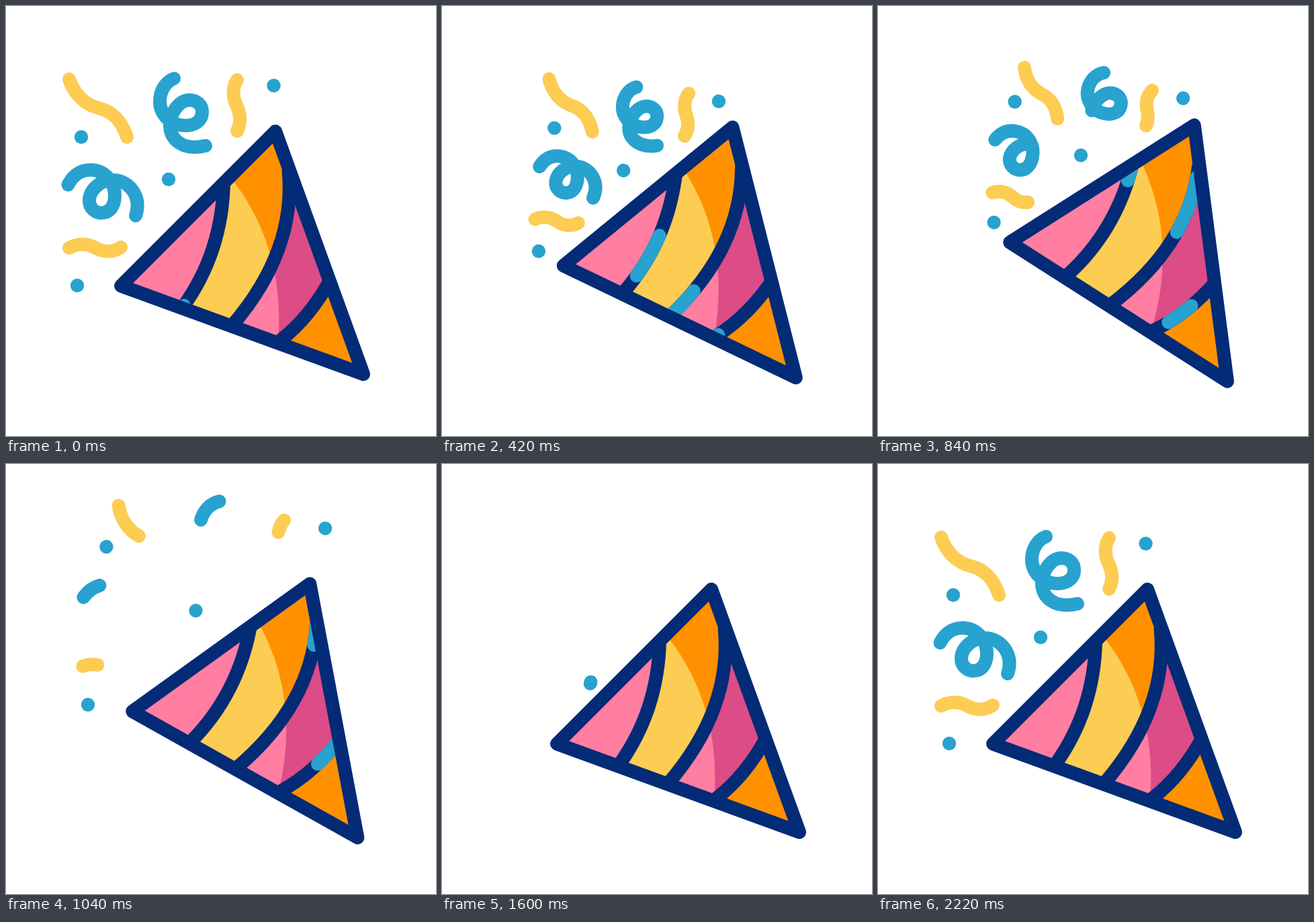
Animation of 640x640 px, one loop 2420 ms. Source, as an HTML page with a canvas:

```html
<!DOCTYPE html>
<html lang="en">
<head>
<meta charset="utf-8">
<title>Party popper</title>
<style>
  html, body { margin: 0; width: 100%; height: 100%; overflow: hidden; background: #fff; }
  canvas { display: block; width: 640px; height: 640px; }
</style>
</head>
<body>
<canvas id="stage" width="640" height="640"></canvas>
<script>
const ctx = document.getElementById('stage').getContext('2d');
const LOOP = 2420;
const NAVY = '#042b76', PINK = '#ff7ea2', YELLOW = '#fdcc52';
const ORANGE = '#ff9100', MAGENTA = '#dc4c87', TEAL = '#28a2cf';

const PIVOT = { x: 477.5, y: 498.5 };
const FOCUS = { x: 266, y: 311 };   // point the confetti shrinks towards

const ease = (t, start, duration) => {
  const u = Math.min(1, Math.max(0, (t - start) / duration));
  return (1 - Math.cos(Math.PI * u)) / 2;
};

function lengthOf(d) {
  const el = document.createElementNS('http://www.w3.org/2000/svg', 'path');
  el.setAttribute('d', d);
  return el.getTotalLength();
}

const curve = (d, extra) => ({ path: new Path2D(d), length: lengthOf(d), ...extra });

// Cone
const cone = new Path2D('M401 186.5 L171 416.5 L532 548 Z');
const stripeD = [
  'M264 447 Q322 366 324 262',
  'M337 475 Q432 364 420.5 245',
  'M408 498 Q453 463 484 405'
];
const stripes = [
  curve(stripeD[0], { start: -50, duration: 1120 }),
  curve(stripeD[1], { start: 139, duration: 1120 }),
  curve(stripeD[2], { start: 315, duration: 1180 })
];
const leftOfFirst = new Path2D(stripeD[0] + ' L300 100 L100 440 Z');
const leftOfSecond = new Path2D(stripeD[1] + ' L420 100 L100 100 L100 475 Z');
const rightOfThird = new Path2D(stripeD[2] + ' L600 405 L600 620 L408 620 Z');
const shade = new Path2D('M330 250 Q416 354 405 500 L600 600 L600 100 L330 100 Z');

// Confetti: leave = start of the burst, enter = start of the return, shift = offset at the return
const ribbons = [
  curve('M92.5 266 C100 251 112 244 126 244 C147 244 162 262 162 282 C162 298 154 308 142 308 ' +
        'C132 308 124 300 124 290 C124 274 140 259 159 259 C181 259 203 281 193 312',
        { color: TEAL, leave: 672, enter: 1570, shift: [28, 15] }),
  curve('M250 108 C237 113 229 127 229 142 C229 163 247 178 267 178 C282 178 292 170 292 158 ' +
        'C292 147 284 140 273 140 C258 140 244 159 244 178 C244 199 264 216 297 208',
        { color: TEAL, leave: 688, enter: 1605, shift: [12, 26] }),
  curve('M94 109 C101 130 117 147 138 152 S172 171 180 195',
        { color: YELLOW, leave: 800, enter: 1683, shift: [27, 29] }),
  curve('M344 110 C336 122 338 138 343 148 S351 172 344 186',
        { color: YELLOW, leave: 730, enter: 1624, shift: [5, 27] }),
  curve('M94 360 C108 352 122 354 133 360 S158 368 171 359',
        { color: YELLOW, leave: 740, enter: 1660, shift: [25, 7] })
];
const dots = [
  { x: 112, y: 195, leave: 670, enter: 1850, shift: [22, 16] },
  { x: 242, y: 258, leave: 700, enter: 1850, shift: [10, 14] },
  { x: 398.5, y: 118.5, leave: 700, enter: 1870, shift: [-8, 22] },
  { x: 106, y: 416, leave: 760, enter: 1870, shift: [24, -6] }
];

const TURN = 1450;   // between the burst and the return
const spread = (t, leave) => 1 - 0.25 * ease(t, 0, 700) + 0.44 * ease(t, leave, 500);

function coneAngle(t) {
  const degrees = 12.7 * ease(t, 0, 900) - 18.7 * ease(t, 900, 500) + 6 * ease(t, 1400, 200);
  return degrees * Math.PI / 180;
}

function fill(path, color) {
  ctx.fillStyle = color;
  ctx.fill(path);
}

function stroke(path, color) {
  ctx.strokeStyle = color;
  ctx.stroke(path);
}

function strokePart(path, length, from, to, color) {
  if (to - from < 0.001) return;
  const whole = from <= 0 && to >= 1;
  ctx.setLineDash(whole ? [] : [(to - from) * length, 3 * length]);
  ctx.lineDashOffset = -from * length;
  stroke(path, color);
  ctx.setLineDash([]);
}

function drawRibbon(r, t) {
  const leaving = t < TURN;
  const scale = leaving ? spread(t, r.leave) : 1;
  const back = ease(t, r.enter, 470);
  const dx = leaving ? FOCUS.x * (1 - scale) : r.shift[0] * (1 - back);
  const dy = leaving ? FOCUS.y * (1 - scale) : r.shift[1] * (1 - back);
  const placed = new Path2D();
  placed.addPath(r.path, new DOMMatrix([scale, 0, 0, scale, dx, dy]));
  const from = leaving ? 0 : 1 - back;
  const to = leaving ? 1 - ease(t, r.leave, 460) : 1;
  strokePart(placed, r.length * scale, from, to, r.color);
}

function drawDot(d, t) {
  let { x, y } = d, size;
  if (t < TURN) {
    const scale = spread(t, d.leave);
    x = FOCUS.x + (x - FOCUS.x) * scale;
    y = FOCUS.y + (y - FOCUS.y) * scale;
    size = 1 - ease(t, d.leave + 370, 90);
  } else {
    size = ease(t, d.enter, 330);
    x += d.shift[0] * (1 - size);
    y += d.shift[1] * (1 - size);
  }
  ctx.fillStyle = TEAL;
  ctx.beginPath();
  ctx.arc(x, y, 10.2 * size, 0, 2 * Math.PI);
  ctx.fill();
}

function drawCone(t) {
  ctx.save();
  ctx.clip(cone);
  fill(cone, PINK);
  fill(shade, MAGENTA);
  ctx.save();
  ctx.clip(leftOfSecond);
  fill(leftOfSecond, YELLOW);
  fill(shade, ORANGE);
  fill(leftOfFirst, PINK);
  ctx.restore();
  fill(rightOfThird, ORANGE);
  for (const s of stripes) {
    stroke(s.path, NAVY);
    const lead = 1.35 * ease(t, s.start, s.duration);
    strokePart(s.path, s.length, Math.max(0, lead - 0.35), Math.min(1, lead), TEAL);
  }
  ctx.restore();
  stroke(cone, NAVY);
}

function draw(t) {
  ctx.setTransform(1, 0, 0, 1, 0, 0);
  ctx.fillStyle = '#fff';
  ctx.fillRect(0, 0, 640, 640);
  ctx.translate(PIVOT.x, PIVOT.y);
  ctx.rotate(coneAngle(t));
  ctx.translate(-PIVOT.x, -PIVOT.y);
  ctx.lineWidth = 20;
  ctx.lineCap = ctx.lineJoin = 'round';
  ribbons.forEach(r => drawRibbon(r, t));
  dots.forEach(d => drawDot(d, t));
  drawCone(t);
}

const begin = performance.now();
function tick() {
  draw((performance.now() - begin) % LOOP);
  requestAnimationFrame(tick);
}
tick();
</script>
</body>
</html>
```
